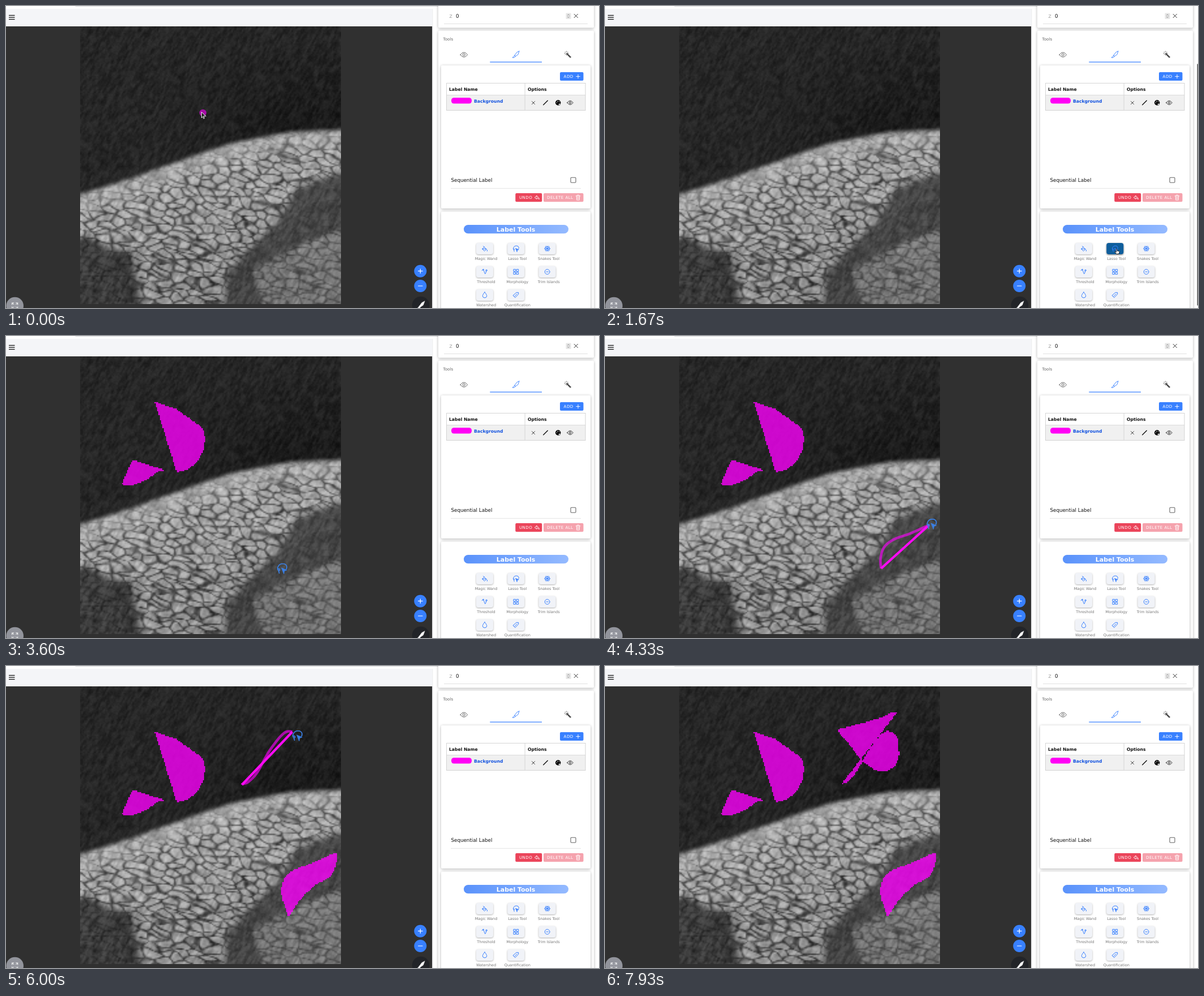
These frames come from a looping animation (1048x534 px, 8140 ms). An HTML page with a canvas:

```html
<!DOCTYPE html>
<html lang="en">
<head>
<meta charset="utf-8">
<title>Lasso labelling</title>
<style>
html, body { margin: 0; width: 100%; height: 100%; overflow: hidden; background: #fff; }
canvas { display: block; width: 1048px; height: 534px; }
</style>
</head>
<body>
<canvas id="stage" width="1048" height="534"></canvas>
<script>
const LOOP = 8140, FPS = 15;
const BLUE = '#3880ff', MAGENTA = '#ff00ff';
const IMG = { x: 131, y: 36, w: 461, h: 491, cols: 200, rows: 213 };
const CELL = IMG.w / IMG.cols;
const stage = document.getElementById('stage').getContext('2d');
let c = stage;

// ---------- helpers ----------
function layer(w, h) {
  const el = document.createElement('canvas');
  el.width = w; el.height = h;
  return el.getContext('2d', { willReadFrequently: true });
}
const clamp = (v, a = 0, b = 1) => Math.min(b, Math.max(a, v));
const smooth = (a, b, v) => { v = clamp((v - a) / (b - a)); return v * v * (3 - 2 * v); };
const mix = (a, b, k) => a + (b - a) * k;

function rect(x, y, w, h, color, r = 0) {
  c.fillStyle = color;
  c.beginPath(); c.roundRect(x, y, w, h, r); c.fill();
}
function card(x, y, w, h) {
  c.save();
  c.shadowColor = 'rgba(0,0,0,.3)'; c.shadowBlur = 5; c.shadowOffsetY = 1;
  rect(x, y, w, h, '#fff', 2);
  c.restore();
}
function disc(x, y, r, color) {
  c.fillStyle = color;
  c.beginPath(); c.arc(x, y, r, 0, 7); c.fill();
}
// y is the middle of the capitals
function text(s, x, y, size, color, { weight = 400, spacing = 0, align = 'left' } = {}) {
  c.font = `${weight} ${size}px "DejaVu Sans", sans-serif`;
  c.letterSpacing = spacing + 'px';
  c.textAlign = align;
  c.fillStyle = color;
  c.fillText(s, x, y + size * .365);
}
function trace(ctx, pts) {
  ctx.beginPath();
  pts.forEach(p => ctx.lineTo(p[0], p[1]));
}

// icons live in a box from -8 to 8
function icon(path, x, y, size, color, line = 1, fill) {
  c.save();
  c.translate(x, y); c.scale(size / 16, size / 16);
  c.lineWidth = line * 16 / size; c.lineCap = c.lineJoin = 'round';
  if (fill) { c.fillStyle = fill; c.fill(path, 'evenodd'); }
  if (color) { c.strokeStyle = color; c.stroke(path); }
  c.restore();
}
const path = d => new Path2D(d);
function spin(d, times) {
  const all = new Path2D(), part = new Path2D(d);
  for (let k = 0; k < times; k++) all.addPath(part, new DOMMatrix().rotate(360 * k / times));
  return all;
}
function rings(...list) {
  const all = new Path2D();
  for (const [x, y, r] of list) { all.moveTo(x + r, y); all.arc(x, y, r, 0, 7); }
  return all;
}
const EYE = path('M-8 0Q0-11 8 0Q0 11-8 0Z');
EYE.addPath(rings([0, 0, 2.6]));
const BRUSH = path('M8-8L5 0L-1 4L-3 2L2-5ZM-3 2L-1 4Q-2 8-8 7Q-5 5-3 2Z');
const PLUS = spin('M0 0V7', 4);
const CROSS = spin('M0 0L6 6', 4);
const LOOP_ICON = path('M-5 8L-6 4Q-9 1-7-3Q-5-8 1-8Q7-8 8-3Q8 0 7 1M-6 4Q-4 4-4 2Q-5 0-7 1');
const POINTER = path('M-1-1L8 3L4 4L3 9Z');

// ---------- scan texture ----------
function hash(x, y) {
  const s = Math.sin(x * 127.1 + y * 311.7) * 43758.5453;
  return s - Math.floor(s);
}
function noise(x, y) {
  const i = Math.floor(x), j = Math.floor(y), u = smooth(0, 1, x - i), v = smooth(0, 1, y - j);
  return mix(mix(hash(i, j), hash(i + 1, j), u), mix(hash(i, j + 1), hash(i + 1, j + 1), u), v);
}
// distance between the two nearest seeds: zero along cell borders
function border(x, y) {
  const i = Math.floor(x), j = Math.floor(y);
  let a = 9, b = 9;
  for (let m = i - 1; m <= i + 1; m++) for (let n = j - 1; n <= j + 1; n++) {
    const d = Math.hypot(m + hash(m, n) - x, n + hash(n + 57, m) - y);
    if (d < a) { b = a; a = d; } else if (d < b) b = d;
  }
  return b - a;
}

const EDGE = [[90, 345], [200, 312], [330, 266], [400, 243], [500, 223], [640, 217]];
function edgeY(x) {
  const k = EDGE.findIndex(p => p[0] > x), a = EDGE[k - 1], b = EDGE[k];
  return mix(a[1], b[1], (x - a[0]) / (b[0] - a[0]));
}

// red: base brightness, green: strength of the cracks
function tissueMap() {
  const m = layer(IMG.cols, IMG.rows);
  m.fillStyle = 'rgb(38,0,0)';
  m.fillRect(0, 0, IMG.cols, IMG.rows);
  const zone = (pts, color, blur) => {
    m.save();
    m.filter = `blur(${blur}px)`;
    m.scale(1 / CELL, 1 / CELL); m.translate(-IMG.x, -IMG.y);
    trace(m, pts);
    m.fillStyle = color; m.fill();
    m.restore();
  };
  zone([...EDGE, [640, 570], [90, 570]], 'rgb(172,255,0)', 1.6);
  zone([[630, 282], [592, 294], [515, 321], [482, 378], [440, 420], [390, 472],
    [386, 570], [470, 570], [440, 468], [535, 420], [630, 385]], 'rgb(74,25,0)', 2);
  zone([[440, 466], [490, 442], [535, 418], [630, 385], [630, 570], [475, 570]], 'rgb(132,120,0)', 2.2);
  zone([[90, 412], [150, 408], [178, 428], [224, 436], [244, 570], [90, 570]], 'rgb(66,45,0)', 2.2);
  return m.getImageData(0, 0, IMG.cols, IMG.rows).data;
}

function scan() {
  const g = layer(IMG.cols, IMG.rows);
  const out = g.createImageData(IMG.cols, IMG.rows), map = tissueMap();
  for (let j = 0, k = 0; j < IMG.rows; j++) for (let i = 0; i < IMG.cols; i++, k += 4) {
    const x = IMG.x + i * CELL, y = IMG.y + j * CELL;
    const depth = y - edgeY(x), crackable = map[k + 1] / 255;
    const wx = x + 14 * noise(x / 22, y / 16), wy = y + 9 * noise(x / 25 + 40, y / 13);
    const gap = border(wx / 25, (wy - .16 * (x - IMG.x)) / 12.5);
    const solid = smooth(-.02, .36, gap + .14 * noise(x / 16, y / 16) - .05);
    const streak = noise((x * .87 + y * .5) / 3.2, (y * .87 - x * .5) / 9) - .5;
    const grain = hash(i + 9, j + 3) - .5;
    let v = map[k];
    v -= 11 * clamp((x - 280) / 200) * clamp((y - 60) / 140) * (1 - smooth(38, 70, v));
    v -= crackable * (clamp(depth, 0, 250) * .1 + (1 - solid) * 92 * mix(.4, 1, smooth(8, 45, depth)));
    v += crackable * (noise(x / 7, y / 6) - .4) * 44;
    v += streak * (depth < 0 ? 22 : 34) + grain * 9;
    out.data[k] = out.data[k + 1] = out.data[k + 2] = v;
    out.data[k + 3] = 255;
  }
  g.putImageData(out, 0, 0);
  return g.canvas;
}

// ---------- fixed interface ----------
const TOOLS = [
  ['Magic Wand', path('M-4-7L5 2L-1 7L-7 1L-1-5M-7 1H5M7 4V7')],
  ['Lasso Tool', LOOP_ICON],
  ['Snakes Tool', spin('M0 0V7M-3 7L0 4L3 7', 6)],
  ['Threshold', path('M-8-4Q-4-8-2-2T1 6Q4 5 4-3')],
  ['Morphology', spin('M1.5 1.5H7V7H1.5Z', 4)],
  ['Trim Islands', rings([0, 0, 7])],
  ['Watershed', path('M0-8Q6-1 6 3Q5 8 0 8Q-5 8-6 3Q-6-1 0-8Z')],
  ['Quantification', path('M-8 1L1-7H7V-2L-2 7ZM-4 4L3-3')]
];
TOOLS[3][1].addPath(rings([-4, -6, 1.5], [5, -4, 2]));
TOOLS[5][1].addPath(path('M-3 0H3'));
const column = k => (k % 3) * 55.3, row = k => Math.floor(k / 3) * 41;

function toolButton(k, heat = 0) {
  const x = 846 + column(k), y = 429 + row(k);
  const shade = [[241, 15], [243, 94], [248, 156]].map(p => Math.round(mix(p[0], p[1], heat)));
  c.save();
  c.shadowColor = 'rgba(0,0,0,.3)'; c.shadowBlur = 3; c.shadowOffsetY = 1;
  rect(x - 15, y - 10, 30, 20, `rgb(${shade})`, 4);
  c.restore();
  icon(TOOLS[k][1], x, y, 10, BLUE);
  if (k === 1) icon(POINTER, x, y, 10, BLUE, .6, BLUE);
}

function viewer() {
  rect(122, -3, 760, 4, '#d9dadd', 2);
  rect(0, 5, 753.5, 31, '#f4f5f8');
  for (let k = -1; k < 2; k++) rect(5, 19.4 + k * 3.5, 10.5, 1.3, '#111');
  rect(0, 36, 753.5, 498, '#303030');
  c.imageSmoothingEnabled = true;
  c.drawImage(scan(), IMG.x, IMG.y, IMG.w, IMG.h);
  disc(732.3, 468.7, 11, BLUE);
  icon(PLUS, 732.3, 468.7, 8.5, '#fff', 1.2);
  disc(732.3, 495, 11, BLUE);
  icon(path('M-7 0H7'), 732.3, 495, 8.5, '#fff', 1.2);
  disc(733, 529, 15.3, '#222428');
  icon(BRUSH, 733, 529, 14, '#fff', .5, '#fff');
  disc(15.7, 530, 15.3, '#92949c');
  icon(spin('M3 3L8 8M3 8H8V3', 4), 15.7, 530, 10, '#fff');
}

function labelCard() {
  const heading = { weight: 700 }, caps = { weight: 500, spacing: .43 };
  card(769, 105, 264, 253);
  rect(979, 117, 41.5, 15, BLUE, 2);
  text('ADD', 985.6, 124.6, 7.1, '#fff', caps);
  icon(PLUS, 1011, 124.6, 7.5, '#fff', .9);

  rect(778, 157, 246, 28, '#f0f0f0');
  c.strokeStyle = '#d4d4d4'; c.lineWidth = 1;
  c.strokeRect(778.5, 136.5, 245.5, 48);
  rect(778, 157, 246, .8, '#d4d4d4');
  rect(916.6, 137, 1, 48, '#d4d4d4');
  text('Label Name', 783, 147, 7.65, '#111', heading);
  text('Options', 922, 147, 7.65, '#111', heading);
  rect(787, 162.3, 36, 10.3, '#ff00f5', 4.5);
  text('Background', 827, 168, 7.65, '#0f50e0', heading);
  icon(CROSS, 932, 171.2, 7, '#333', .9);
  icon(path('M-6 6L6-6'), 953.5, 171, 10, '#111', 1.5);
  icon(rings([0, 0, 8], [-4, 0, 1.3], [-1, -4, 1.3], [4, -3, 1.3], [4, 5, 2.5]), 975.7, 171, 9.5, null, 1, '#000');
  icon(EYE, 997, 171, 10.5, '#222', .9);

  text('Sequential Label', 786.5, 308, 8.74, '#111');
  c.strokeStyle = '#666'; c.lineWidth = 1.1;
  c.beginPath(); c.roundRect(998, 303.3, 9, 9, 1.2); c.stroke();
  rect(786, 322, 230, .8, '#dcdcdc');
  rect(900.3, 331, 47, 15.3, '#eb445a', 2);
  text('UNDO', 907, 338.7, 7.1, '#fff', caps);
  icon(path('M-1-6L-8 0L-1 5V2Q5 2 7 6Q7-3-1-3Z'), 938.5, 338.7, 8.5, '#fff', .9);
  rect(950, 331, 70.5, 15.3, '#f5a2ad', 2);
  text('DELETE ALL', 956, 338.7, 7.1, '#fff', caps);
  icon(path('M-7-5H7M-3-5V-8H3V-5M-5-5L-4 8H4L5-5M-2-2V5M2-2V5'), 1011, 338.7, 9, '#fff', .8);
}

function panel() {
  rect(753.5, 5, 294.5, 529, '#fff');
  rect(753.5, 5, .8, 529, '#e4e4e6');
  card(764, -20, 275, 58.5);
  rect(774, 31, 254, .8, '#d8d8d8');
  text('Z', 783.6, 17.8, 7.65, '#999');
  text('0', 795, 17.8, 8.74, '#111', { weight: 500 });
  rect(989.5, 12.5, 9, 10.5, '#e6e6e6', 1);
  icon(spin('M-4 3L0 7L4 3', 2), 994, 17.7, 6.5, '#777', .8);
  icon(CROSS, 1007.3, 17.5, 8.5, '#333');

  card(764, 43.5, 275, 520);
  text('Tools', 772.6, 58.2, 7.1, '#666');
  icon(EYE, 809.3, 86.2, 12.5, '#666');
  icon(BRUSH, 901, 86, 12, BLUE, .9);
  icon(path('M-2-4L8 6L6 8L-4-2Z'), 993, 86, 11, '#444', .8, '#444');
  icon(spin('M0 3.5V5', 8), 990.5, 83.5, 11, '#444', .8);
  rect(855.3, 98.5, 91.7, 1.2, BLUE);
  labelCard();

  card(769, 363.5, 264, 200);
  const shade = c.createLinearGradient(809, 0, 994, 0);
  shade.addColorStop(0, '#5a92fb');
  shade.addColorStop(1, '#94baff');
  rect(809, 387, 185, 15.3, shade, 7.6);
  text('Label Tools', 901, 394.7, 10.92, '#fff', { weight: 700, align: 'center' });
  TOOLS.forEach(([name], k) => {
    toolButton(k);
    text(name, 848.5 + column(k), 447 + row(k), 6.55, '#777', { align: 'center' });
  });
}

// ---------- motion, in steps of a fifteenth of a second ----------
// the points of a lasso are reached at even intervals
const LASSOS = [
  { fill: 37, pts: [[263, 116], [302, 130], [347, 162], [352, 180], [349, 202], [338, 222], [321, 236], [302, 241]] },
  { from: 45, to: 50, fill: 51, pts: [[224, 219], [216, 236], [206, 262], [226, 263], [250, 253], [286, 239]] },
  { from: 54, to: 76, fill: 78, pts: [[488, 411], [487, 394], [493, 374], [510, 360], [540, 349], [567, 337],
    [584, 332], [581, 358], [570, 374], [547, 387], [520, 413], [500, 444]] },
  { from: 85, to: 102, fill: 103, pts: [[417, 210], [428, 205], [444, 188], [467, 148], [494, 117], [515, 123],
    [519, 147], [518, 164], [508, 180], [488, 186], [468, 178], [450, 162], [432, 139], [412, 114],
    [430, 108], [458, 100], [488, 91], [516, 82]] }
];
// [step, x, y] between the lassos
const TRAVEL = [
  [0, 348, 189], [7, 348, 189], [8, 360, 195], [14, 690, 340], [20, 897, 428], [25, 903, 433], [36, 903, 433],
  [37, 262, 118], [40, 262, 118], [44, 229, 212], [51, 360, 290], [53, 488, 412],
  [77, 500, 443], [79, 500, 424], [83, 424, 228],
  [103, 527, 112], [104, 534, 166], [105, 538, 197], [109, 428, 130], [118, 35, -3], [122, 35, -40]
];
const TRACK = [...TRAVEL, ...LASSOS.slice(1).flatMap(({ from, to, pts }) =>
  pts.map((p, k) => [mix(from, to, k / (pts.length - 1)), ...p]))].sort((a, b) => a[0] - b[0]);

function slope(k, axis) {
  const a = TRACK[Math.max(0, k - 1)], b = TRACK[Math.min(TRACK.length - 1, k + 1)];
  return (b[axis] - a[axis]) / (b[0] - a[0]);
}
function at(n) {
  const k = clamp(TRACK.findIndex(p => p[0] > n), 1, TRACK.length - 1);
  const a = TRACK[k - 1], b = TRACK[k], d = b[0] - a[0], u = (n - a[0]) / d;
  if (a[1] === b[1] && a[2] === b[2]) return [a[1], a[2]];
  return [1, 2].map(ax => mix(a[ax], b[ax], smooth(0, 1, u))
    + d * u * (1 - u) * ((1 - u) * slope(k - 1, ax) - u * slope(k, ax)));
}
function pen(from, to) {
  const pts = [];
  for (let n = from; n < to; n += .1) pts.push(at(n));
  pts.push(at(to));
  return pts;
}

// fills follow the pixels of the scan
function mask(pts) {
  const m = layer(IMG.cols, IMG.rows);
  m.scale(1 / CELL, 1 / CELL); m.translate(-IMG.x, -IMG.y);
  trace(m, pts);
  m.fillStyle = MAGENTA; m.fill('evenodd');
  const px = m.getImageData(0, 0, IMG.cols, IMG.rows);
  for (let k = 3; k < px.data.length; k += 4) px.data[k] = px.data[k] > 110 ? 197 : 0;
  m.putImageData(px, 0, 0);
  return m.canvas;
}
for (const l of LASSOS) l.mask = mask(l.from ? pen(l.from, l.to) : l.pts);

function drawLasso(l, n) {
  if (n >= l.fill) {
    c.imageSmoothingEnabled = false;
    c.drawImage(l.mask, IMG.x, IMG.y, IMG.w, IMG.h);
    return;
  }
  const end = Math.min(n - .5, l.to);
  if (!l.from || end <= l.from) return;
  const pts = pen(l.from, end);
  c.lineJoin = 'round'; c.lineCap = 'butt';
  trace(c, pts);
  c.strokeStyle = 'rgba(255,0,255,.62)'; c.lineWidth = 4.6; c.stroke();
  trace(c, [pts[0], pts[pts.length - 1]]);
  c.strokeStyle = '#ff0af5'; c.lineWidth = 4.2; c.stroke();
}

const ARROW = path('M-8-8V5L-5 2L-3 7L-1 6L-3 1H2Z');
const HAND = path('M-3-7Q-1-9 0-7V-2L6-1Q8 0 7 3L5 8H-2L-7 2Q-7-1-3 2Z');
function drawCursor(n) {
  if (n >= 119) return;
  const [x, y] = at(n);
  if (n >= 37 && y > 36) {
    icon(LOOP_ICON, x, y, 16.5, '#3a80e6', 1.7);
    icon(POINTER, x, y, 16.5, '#3a80e6', .8, '#3a80e6');
  } else if (n >= 19 && n < 37) {
    icon(HAND, x + 2, y + 1, 9, '#111', .9, '#fff');
  } else {
    if (n < 37 && x < IMG.x + IMG.w) disc(x, y, 6.2, 'rgba(190,10,190,.85)');
    icon(ARROW, x + 3.5, y + 5, 12, '#fff', .9, '#222');
  }
}

function drawScrollbar(n) {
  const alpha = smooth(13, 18, n) * (1 - smooth(45, 51, n));
  if (!alpha) return;
  c.globalAlpha = alpha;
  if (n < 37) rect(1046.5, 102.5, 1.5, 427, '#555');
  else rect(1046.5, 101, 1.5, 420, '#555');
  c.globalAlpha = 1;
}

const base = layer(1048, 534);
c = base;
rect(0, 0, 1048, 534, '#fff');
viewer();
panel();
c = stage;

function frame(now) {
  const n = Math.floor((now % LOOP + 5) * FPS / 1000);
  c.drawImage(base.canvas, 0, 0);
  LASSOS.forEach(l => drawLasso(l, n));
  if (n >= 19 && n < 37) toolButton(1, smooth(19, 24, n));
  drawScrollbar(n);
  drawCursor(n);
}
const start = performance.now();
(function tick() {
  frame(performance.now() - start);
  requestAnimationFrame(tick);
})();
</script>
</body>
</html>
```
